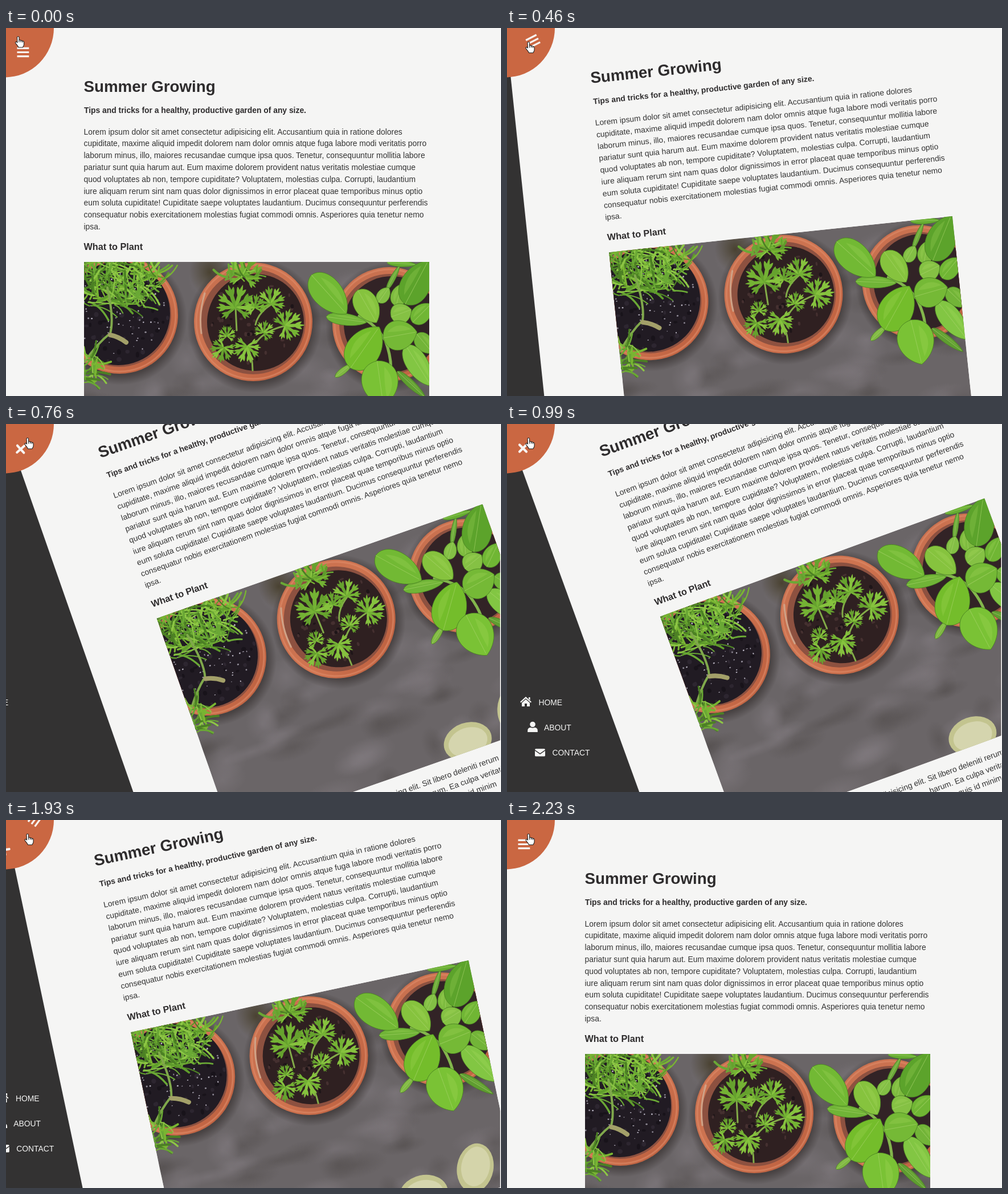
An HTML page that plays this animation: 869x645 px, repeating every 2540 ms.

```html
<!DOCTYPE html>
<html lang="en">
<head>
<meta charset="utf-8">
<title>Summer Growing</title>
<style>
html, body { margin: 0; width: 100%; height: 100%; overflow: hidden; background: #333; }
svg { display: block; width: 869px; height: 645px; }
text { font-family: "Liberation Sans", Arial, sans-serif; font-size: 13.87px; fill: #333; }
.bold { font-weight: bold; fill: #2e2c2d; }
#nav text { fill: #f5f5f4; }
</style>
</head>
<body>
<svg viewBox="0 0 869 645">
  <defs>
    <clipPath id="frame"><rect x="137" y="410" width="606" height="401"/></clipPath>
    <radialGradient id="dark"><stop stop-color="#46413f" stop-opacity=".6"/><stop offset="1" stop-color="#46413f" stop-opacity="0"/></radialGradient>
    <radialGradient id="light"><stop stop-color="#8d868c" stop-opacity=".6"/><stop offset="1" stop-color="#8d868c" stop-opacity="0"/></radialGradient>
    <radialGradient id="moss"><stop stop-color="#453d2a" stop-opacity=".9"/><stop offset="1" stop-color="#453d2a" stop-opacity="0"/></radialGradient>
    <radialGradient id="shade"><stop offset=".85" stop-color="#322c2b" stop-opacity=".6"/><stop offset="1" stop-color="#322c2b" stop-opacity="0"/></radialGradient>
    <linearGradient id="clay" x2="1" y2="1"><stop stop-color="#c56f4f"/><stop offset=".5" stop-color="#cf7450"/><stop offset="1" stop-color="#b95c3c"/></linearGradient>
  </defs>
  <rect width="869" height="645" fill="#333232"/>
  <g id="page">
    <rect x="-2.5" width="2000" height="2000" fill="#f5f5f4"/>
    <g id="copy"></g>
    <g id="photo" clip-path="url(#frame)"></g>
  </g>
  <rect x="867.5" width="1.5" height="645" fill="#f6f6f6"/>
  <circle cx="-2.5" cy="0" r="86.5" fill="#ca6742"/>
  <g id="dial" stroke="#f8f5f3" fill="none">
    <path d="M19.5 35.3H40.3M19.5 42.5H40.3M19.5 49.7H40.3" stroke-width="3.2"/>
    <path d="M22 36.5L34 48.5M34 36.5L22 48.5" stroke-width="4.2" stroke-linecap="round" transform="rotate(90 -2.5 0)"/>
  </g>
  <g id="nav" fill="#f5f5f4">
    <g>
      <path d="M33 478L43 487L41.6 488.5L33 481L24.4 488.5L23 487ZM38 479h2.6v5l-2.6-2.3ZM33 482.6L40 488.7V495H35v-5h-4v5h-5v-6.3Z"/>
      <text x="55.5" y="493">HOME</text>
    </g>
    <g>
      <circle cx="45" cy="526.5" r="4.8"/>
      <path d="M36.2 540v-2.5q0-5.5 5.5-5.5q3.3 1.4 6.6 0q5.5 0 5.5 5.5V540Z"/>
      <text x="65" y="537">ABOUT</text>
    </g>
    <g>
      <path d="M49 571q0-1.8 1.8-1.8H65.2q1.8 0 1.8 1.8L58 577.3ZM49 572.8L58 579L67 572.8V581q0 1.5-1.8 1.5H50.8q-1.8 0-1.8-1.5Z"/>
      <text x="79.5" y="581">CONTACT</text>
    </g>
  </g>
  <circle id="press" cx="37.5" cy="24.5" r="10.5" fill="#e2ad22"/>
  <path id="hand" fill="#fff" stroke="#222" stroke-width="1.1" stroke-linejoin="round"
    d="M-2 1.5c0-2 3.5-2 3.5 0v5c1-.8 2.8-.5 3 .7c1-.7 2.6-.2 2.8 .9c1.2-.5 2.7 .2 2.7 1.6v4c0 3-1.5 3-2 5.3h-7.5c-.5-2-3-4.5-5-7.2c-1.5-2.2 .8-3.4 2.2-2l.8 .8zM1.5 6.5V10M4.5 7.2V10M7.3 8.1V10.5"/>
</svg>
<script>
const $ = id => document.getElementById(id);
const clamp = v => Math.min(1, Math.max(0, v));

// Article text
const line = (x, y, str, attrs = '') => `<text x="${x}" y="${y}" ${attrs}>${str}</text>`;
const intro = [
  'Lorem ipsum dolor sit amet consectetur adipisicing elit. Accusantium quia in ratione dolores',
  'cupiditate, maxime aliquid impedit dolorem nam dolor omnis atque fuga labore modi veritatis porro',
  'laborum minus, illo, maiores recusandae cumque ipsa quos. Tenetur, consequuntur mollitia labore',
  'pariatur sunt quia harum aut. Eum maxime dolorem provident natus veritatis molestiae cumque',
  'quod voluptates ab non, tempore cupiditate? Voluptatem, molestias culpa. Corrupti, laudantium',
  'iure aliquam rerum sint nam quas dolor dignissimos in error placeat quae temporibus minus optio',
  'eum soluta cupiditate! Cupiditate saepe voluptates laudantium. Ducimus consequuntur perferendis',
  'consequatur nobis exercitationem molestias fugiat commodi omnis. Asperiores quia tenetur nemo',
  'ipsa.'
];
$('copy').innerHTML =
  line(136.5, 112, 'Summer Growing', 'class="bold" style="font-size:27.74px"') +
  line(137, 149, 'Tips and tricks for a healthy, productive garden of any size.', 'class="bold"') +
  intro.map((str, i) => line(136.5, 186.6 + i * 20.8, str)).join('') +
  line(136.5, 389, 'What to Plant', 'class="bold" style="font-size:16.23px"') +
  line(136.5, 843, 'Lorem ipsum dolor sit, amet consectetur adipisicing elit. Sit libero deleniti rerum') +
  line(477, 863.8, 'harum. Ea culpa veritatis') +
  line(604, 884.6, 'quis id minim', 'text-anchor="end"');

// Photo
let seed = 7;
const rand = (a, b) => {
  seed = (seed * 16807) % 2147483647;
  return a + (b - a) * seed / 2147483647;
};
const pick = list => list[Math.floor(rand(0, list.length))];
const repeat = (n, fn) => Array.from({ length: n }, fn).join('');
const oval = (x, y, rx, ry, fill, attrs = '') =>
  `<ellipse cx="${x}" cy="${y}" rx="${rx}" ry="${ry}" fill="${fill}" ${attrs}/>`;
const stroke = (d, color, width) =>
  `<path d="${d}" fill="none" stroke="${color}" stroke-width="${width}" stroke-linecap="round"/>`;

const pot = (x, y, r, sx, sy, sr, soil) =>
  oval(x + 2, y + 6, r + 14, r + 14, 'url(#shade)') +
  oval(x, y, r, r, 'url(#clay)') +
  oval(x, y, r - 4, r - 4, 'none', 'stroke="#df8b68" stroke-width="3" opacity=".6"') +
  oval(x, y, r - 12, r - 12, '#8d5140') +
  oval(sx, sy, sr, sr, soil);

const crumbs = (n, x, y, reach, size, colors) => repeat(n, () => {
  const a = rand(0, 6.28), r = Math.sqrt(rand(0, 1)) * reach;
  return oval(x + r * Math.cos(a), y + r * Math.sin(a), rand(.4, 1) * size, rand(.4, 1) * size, pick(colors));
});

const blade = (l, w) =>
  `M${-l} 0C${-l * .9} ${-w * 1.33} ${l * .5} ${-w * 1.33} ${l} 0C${l * .5} ${w * 1.33} ${-l * .9} ${w * 1.33} ${-l} 0Z`;

const broadLeaf = ([x, y, length, width, angle, fill]) => {
  const l = length / 2, w = width / 2;
  return `<g transform="translate(${x} ${y}) rotate(${angle})">
    <path d="${blade(l, w)}" fill="${fill}" stroke="#4a8222" stroke-width=".8"/>
    <path d="M${-l * .7} ${-w * .35}Q0 ${-w} ${l * .7} ${-w * .25}Q0 ${-w * .2} ${-l * .7} ${-w * .35}" fill="#b6e06a" opacity=".2"/>
    <path d="M${-l} 0H${l * .9}" stroke="#a9d46c" stroke-width="1" opacity=".6"/></g>`;
};

const frond = ([x, y, size, angle]) => {
  let out = '';
  for (let a = -126; a <= 126; a += 36) {
    const l = size * (1 - Math.abs(a) / 420) / 2;
    const fill = pick(['#74b234', '#86c23e', '#66a22e']);
    out += `<g transform="rotate(${a}) translate(${l} 0)" fill="${fill}"><path d="${blade(l, l * .17)}"/>` +
      [-28, 28].map(b => `<path d="${blade(l * .45, l * .15)}" transform="rotate(${b}) translate(${l * .35} 0)"/>`).join('') + '</g>';
  }
  return `<g transform="translate(${x} ${y}) rotate(${angle})">${out}</g>`;
};

const dill = (n, x0, x1, y0, y1, reach) => repeat(n, () => {
  const x = rand(x0, x1), y = rand(y0, y1), a = rand(-2.7, .9), len = rand(.4, 1) * reach;
  const dx = Math.cos(a) * len, dy = Math.sin(a) * len;
  return stroke(`M${x} ${y}q${dx * .6} ${dy * .2} ${dx} ${dy}`,
    pick(['#79b532', '#5f9c2b', '#8dc645', '#4c8024', '#6aa835']), rand(1.8, 4.2));
});

const broadLeaves = [
  [680, 437, 50, 9, -62, '#6ba83a'], [695, 413, 52, 11, 4, '#66ad32'],
  [593, 600, 38, 11, -38, '#7fb743'], [712, 625, 68, 14, 43, '#5f9d31'],
  [598, 511, 72, 21, 8, '#70b437'], [567, 467, 92, 52, 48, '#72b934'],
  [663, 468, 32, 22, -55, '#83bf45'], [690, 468, 40, 28, -75, '#7ebb3f'],
  [721, 446, 86, 52, -62, '#5ca32b'], [730, 500, 46, 32, -45, '#70b634'],
  [735, 553, 44, 30, 50, '#72b438'], [694, 500, 38, 36, -20, '#85c144'],
  [634, 488, 66, 42, 60, '#86c33e'], [724, 592, 84, 38, 58, '#82c643'],
  [692, 538, 60, 52, -10, '#75b936'], [630, 560, 88, 60, -55, '#74bd2b'],
  [657, 623, 80, 64, 82, '#7ac235']
];
const fronds = [
  [418, 434, 42, -80], [437, 490, 26, -100], [403, 490, 44, -90],
  [465, 483, 33, -80], [490, 522, 36, -20], [382, 560, 29, 120],
  [388, 540, 21, -90], [423, 558, 32, 95], [452, 534, 24, -60]
];

$('photo').innerHTML =
  '<rect x="137" y="410" width="606" height="401" fill="#6a6567"/>' +
  repeat(80, () => oval(rand(137, 743), rand(410, 811), rand(20, 60), rand(12, 36), pick(['url(#dark)', 'url(#light)']), 'opacity=".55"')) +
  oval(358, 428, 36, 42, 'url(#moss)') +
  pot(199, 503, 103, 197, 500, 91, '#211b23') +
  crumbs(60, 200, 502, 84, 5, ['#2d2630', '#18131a']) +
  crumbs(80, 200, 502, 84, 1.8, ['#b5b0bd', '#8d8894']) +
  dill(170, 130, 245, 408, 490, 48) +
  dill(16, 235, 275, 425, 465, 42) +
  stroke('M178 455Q190 510 183 535Q160 553 138 585', '#80a84c', 4) +
  stroke('M183 538Q198 541 211 551', '#a3a069', 8) +
  dill(38, 132, 160, 570, 622, 32) +
  pot(434, 515, 104, 438, 516, 85, '#2f2021') +
  crumbs(70, 438, 516, 78, 4, ['#453030', '#1e1518']) +
  stroke('M349 465Q338 500 343 535', '#cfa287', 3) +
  stroke('M403 490L405 530M465 485Q442 500 438 520M490 522Q455 530 440 550M423 558Q433 575 433 600', '#82ab48', 3) +
  fronds.map(frond).join('') +
  dill(18, 385, 440, 425, 445, 30) +
  pot(673, 519, 100, 677, 519, 84, '#322326') +
  stroke('M665 545Q682 590 672 620M620 505Q650 520 664 545', '#83b64c', 5) +
  broadLeaves.map(broadLeaf).join('') +
  oval(679, 768, 32, 43, '#c3c48f', 'transform="rotate(22 679 768)"') +
  oval(680, 766, 25, 35, '#d4d4aa', 'transform="rotate(22 680 766)"') +
  oval(581, 794, 43, 33, '#c3c48f') +
  oval(581, 795, 35, 25, '#d5d5ae');

// Motion
const LOOP = 2540, TICK = 76.9;

// The picture is held between ticks, restarting at the second click.
function hold(t) {
  const base = t < 1620 ? 0 : 1623;
  return base + Math.floor((t + 9.99 - base) / TICK) * TICK;
}

// cubic-bezier(.42, 0, 1, 1)
function easeIn(x) {
  let lo = 0, hi = 1, s = x;
  for (let i = 0; i < 20; i++) {
    s = (lo + hi) / 2;
    if (1.26 * s * (1 - s) ** 2 + 3 * s * s * (1 - s) + s ** 3 < x) lo = s; else hi = s;
  }
  return 3 * s * s - 2 * s ** 3;
}

const links = [...$('nav').children];
const hiddenShift = [122, 164, 194];

function draw(time) {
  const t = hold(time);
  const open = clamp((t - 322.6) / 462.5) - clamp((t - 1730.6) / 500);
  $('page').setAttribute('transform', `rotate(${-20 * open} -2.5 0)`);
  $('dial').setAttribute('transform', `rotate(${-90 * open} -2.5 0)`);

  const hidden = t < 1700 ? 1 - easeIn(clamp((t - 599) / 400)) : easeIn(clamp((t - 1730.6) / 400));
  links.forEach((link, i) => link.setAttribute('transform', `translate(${-hiddenShift[i] * hidden} 0)`));

  const moved = clamp(t / 225);
  $('hand').setAttribute('transform', `translate(${21.5 + 16.5 * moved} ${15 + 9.5 * moved})`);
  const pressed = (t > 225 && t < 320) || (t > 1620 && t < 1730);
  $('press').setAttribute('visibility', pressed ? 'visible' : 'hidden');
}

const start = performance.now();
function tick() {
  draw((performance.now() - start) % LOOP);
  requestAnimationFrame(tick);
}
draw(0);
requestAnimationFrame(tick);
</script>
</body>
</html>
```
